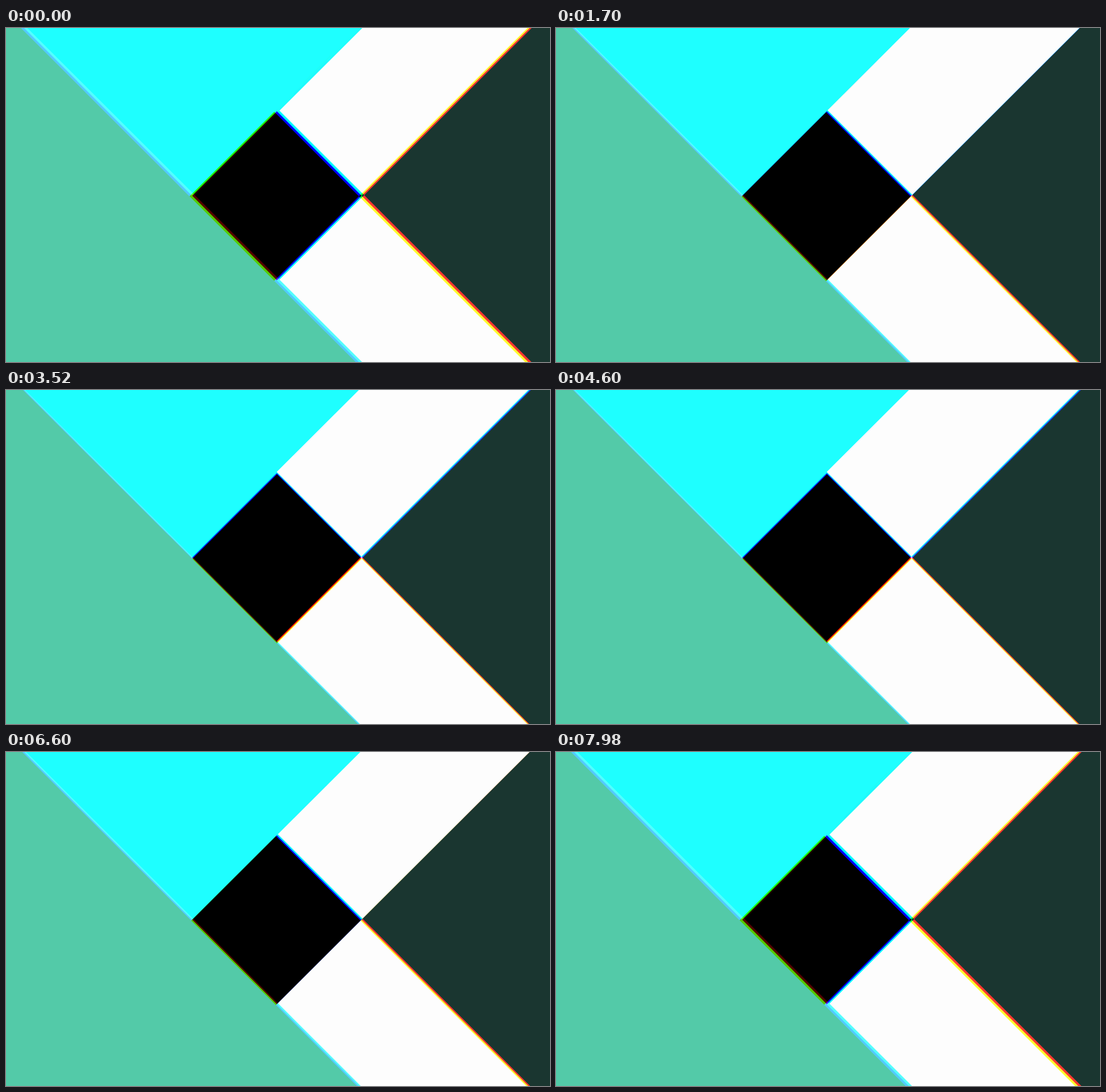
Write an HTML page with a canvas that moves like this. It is 954x587 px and loops after 8 s.

```html
<!DOCTYPE html>
<html lang="en">
<head>
<meta charset="utf-8">
<title>Colour split</title>
<style>
html, body { margin: 0; width: 100%; height: 100%; overflow: hidden; background: #000; }
canvas { display: block; }
</style>
</head>
<body>
<canvas id="stage" width="954" height="587"></canvas>
<script>
const ctx = document.getElementById('stage').getContext('2d');
const LOOP = 8000, STEPS = 172;
const CENTER = [475, 294.7];
const HALF = 148.5, FAR = 2500;

// Disjoint areas along the diagonals u = x + y and v = x - y: colour, u range, v range.
const areas = [
  [[83, 202, 168], -FAR, FAR, -FAR, -HALF],
  [[30, 255, 255], -FAR, -HALF, -HALF, FAR],
  [[253, 253, 253], -HALF, HALF, HALF, FAR],
  [[253, 253, 253], HALF, FAR, -HALF, HALF],
  [[26, 54, 48], HALF, FAR, HALF, FAR],
];

// Steps last 20, 100 and 20 ms in turn.
function stepAt(ms) {
  const rest = ms % 140;
  return 3 * Math.floor(ms / 140) + (rest >= 20) + (rest >= 120);
}

function channelColor(color, channel) {
  return `rgb(${color.map((value, i) => i === channel ? value : 0)})`;
}

function draw(ms) {
  // Ease out to the far pose and back the same way.
  const phase = stepAt(ms) / (STEPS / 2);
  const progress = phase < 1 ? phase : 2 - phase;
  const remaining = (1 - progress) ** 2;
  const shiftX = -0.3 + 4.95 * remaining;
  const shiftY = -2.1 + 1.15 * remaining;

  ctx.setTransform(1, 0, 0, 1, 0, 0);
  ctx.globalCompositeOperation = 'source-over';
  ctx.fillStyle = '#000';
  ctx.fillRect(0, 0, 954, 587);

  // Red moves one way, blue the other; green stays.
  ctx.globalCompositeOperation = 'lighter';
  for (let channel = 0; channel < 3; channel++) {
    const side = 1 - channel;
    ctx.setTransform(.5, .5, .5, -.5, CENTER[0] + side * shiftX, CENTER[1] + side * shiftY);
    for (const [color, u0, u1, v0, v1] of areas) {
      ctx.fillStyle = channelColor(color, channel);
      ctx.fillRect(u0, v0, u1 - u0, v1 - v0);
    }
  }
}

function tick() {
  draw(performance.now() % LOOP);
  requestAnimationFrame(tick);
}
tick();
</script>
</body>
</html>
```
